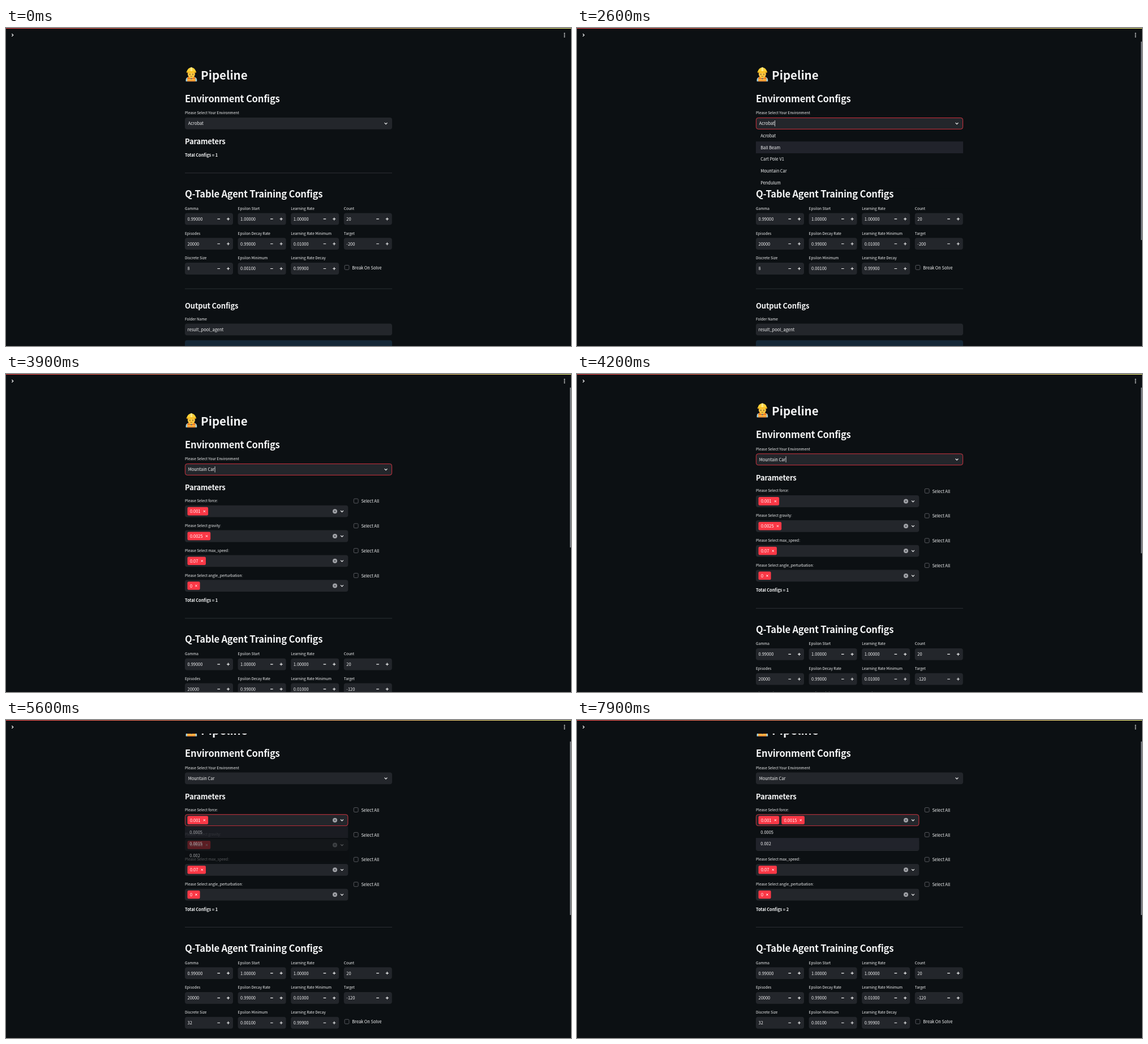
An HTML page with a canvas for the animation above (8 s loop, 998x561 px).

```html
<!DOCTYPE html>
<html lang="en">
<head>
<meta charset="utf-8">
<title>Pipeline</title>
<style>
  html, body { margin: 0; width: 100%; height: 100%; overflow: hidden; background: #0c1013; }
  canvas { display: block; width: 998px; height: 561px; }
</style>
</head>
<body>
<canvas id="stage"></canvas>
<script>
const W = 998, H = 561, LOOP = 8000, TICK = 100;
const BG = '#0c1013', FIELD = '#23262b', INK = '#f4f5f6', RED = '#fb3846', HOVER = '#21232b';
const LEFT = 316, FULL = 366, BOX_H = 20.8, ROW = 43.8, HEADER = 24;
const FONT = '"Noto Sans CJK JP", "Noto Sans CJK SC", "Noto Sans CJK", "Noto Sans", sans-serif';
const CJK = 1.117; // Latin letters in this family are drawn larger per em

const STYLES = {
  h1: { size: 22.88, weight: 700, gap: 0 },
  h2: { size: 18.55, weight: 700, gap: -0.22 },
  h3: { size: 14.5, weight: 700, gap: -0.17 },
  strong: { size: 8.25, weight: 700, gap: -0.06 },
  body: { size: 8.32, weight: 400, gap: 0 },
  label: { size: 7.28, weight: 400, gap: 0 }
};

const canvas = document.getElementById('stage');
const dpr = window.devicePixelRatio || 1;
canvas.width = W * dpr;
canvas.height = H * dpr;
const ctx = canvas.getContext('2d');

// Progress of a change that takes n ticks and is already under way at `start`
const ramp = (t, start, n) => Math.max(0, Math.min(1, (t - start + TICK) / (n * TICK)));

function setStyle(name) {
  const s = STYLES[name];
  ctx.font = `${s.weight} ${s.size / CJK}px ${FONT}`;
  ctx.letterSpacing = s.gap + 'px';
  return s;
}

function text(str, x, cy, name = 'body', color = INK) {
  const s = setStyle(name);
  ctx.fillStyle = color;
  ctx.fillText(str, x, cy + s.size * 0.3555);
}

function textWidth(str) {
  setStyle('body');
  return ctx.measureText(str).width;
}

function round(x, y, w, h, r, color) {
  ctx.fillStyle = color;
  ctx.beginPath();
  ctx.roundRect(x, y, w, h, r);
  ctx.fill();
}

function dot(x, y, r, color) {
  ctx.fillStyle = color;
  ctx.beginPath();
  ctx.arc(x, y, r, 0, 7);
  ctx.fill();
}

function lines(color, width, ...paths) {
  ctx.strokeStyle = color;
  ctx.lineWidth = width;
  ctx.beginPath();
  for (const p of paths) {
    ctx.moveTo(p[0], p[1]);
    for (let i = 2; i < p.length; i += 2) ctx.lineTo(p[i], p[i + 1]);
  }
  ctx.stroke();
}

function faded(alpha, draw) {
  if (alpha <= 0) return;
  ctx.save();
  ctx.globalAlpha = alpha;
  draw();
  ctx.restore();
}

function chevron(x, y) {
  lines(INK, 1.2, [x - 2.4, y - 1.2, x, y + 1.2, x + 2.4, y - 1.2]);
}

function cross(x, y, r, color, width) {
  lines(color, width, [x - r, y - r, x + r, y + r], [x + r, y - r, x - r, y + r]);
}

function field(x, cy, w, focus = 0) {
  round(x, cy - BOX_H / 2, w, BOX_H, 4, FIELD);
  faded(focus, () => {
    ctx.strokeStyle = '#e0323f';
    ctx.lineWidth = 0.9;
    ctx.beginPath();
    ctx.roundRect(x + 0.45, cy - BOX_H / 2 + 0.45, w - 0.9, BOX_H - 0.9, 3.8);
    ctx.stroke();
  });
}

function checkbox(x, cy, label) {
  ctx.strokeStyle = '#6b6d73';
  ctx.lineWidth = 0.8;
  ctx.beginPath();
  ctx.roundRect(x + 0.4, cy - 4, 7.8, 7.8, 1.6);
  ctx.stroke();
  text(label, x + 13.5, cy + 0.2);
}

function numberInput(label, value, col, row, dy) {
  const x = LEFT + col * 93.6, cy = 336.9 + row * ROW + dy;
  text(label, x, cy - 18.6, 'label');
  field(x, cy, 85);
  text(value, x + 4.5, cy);
  lines(INK, 1.1,
    [x + 57.4, cy, x + 62, cy],
    [x + 74, cy, x + 79, cy],
    [x + 76.5, cy - 2.5, x + 76.5, cy + 2.5]);
}

function multiSelect(label, tags, i, focus) {
  const cy = 242.2 + i * ROW;
  text('Please Select ' + label + ':', LEFT, cy - 18.6, 'label');
  field(LEFT, cy, 288.3, focus);
  let x = 320.5;
  for (const tag of tags) {
    const w = textWidth(tag) + 18;
    round(x, cy - 7.4, w, 14.6, 2.2, RED);
    text(tag, x + 4.4, cy, 'body', '#fff');
    cross(x + w - 6.7, cy, 1.6, '#fff', 1);
    x += w + 4.2;
  }
  dot(581, cy, 4, '#a3a5aa');
  cross(581, cy, 1.5, FIELD, 0.8);
  chevron(593.5, cy);
  checkbox(613.9, cy - 18.1, 'Select All');
}

function dropdown(options, top, w, active) {
  ctx.fillStyle = BG;
  ctx.fillRect(LEFT, top, w, options.length * BOX_H);
  options.forEach((name, i) => {
    const y = top + i * BOX_H;
    if (i === active) {
      ctx.fillStyle = HOVER;
      ctx.fillRect(LEFT, y, w, BOX_H);
    }
    text(name, LEFT + 8.2, y + BOX_H / 2);
  });
}

function linkIcon(cy) {
  dot(301.5, cy, 9.5, '#12131a');
  ctx.save();
  ctx.translate(301.5, cy);
  ctx.rotate(-Math.PI / 4);
  ctx.strokeStyle = '#9092a0';
  ctx.lineWidth = 0.9;
  for (const side of [-1, 1]) {
    ctx.beginPath();
    ctx.moveTo(side * 0.3, side * 2);
    ctx.lineTo(side * 3, side * 2);
    ctx.arc(side * 3, 0, 2, side * Math.PI / 2, -side * Math.PI / 2, side > 0);
    ctx.lineTo(side * -0.2, side * -2);
    ctx.stroke();
  }
  lines('#9092a0', 0.9, [-1.8, 0, 1.8, 0]);
  ctx.restore();
}

function worker() {
  const cx = 327.4;
  // shirt and vest
  round(cx - 9.8, 86.6, 19.6, 7.6, [5, 5, 0.5, 0.5], '#9fd0dc');
  round(cx - 7.2, 86.2, 14.4, 8, [3, 3, 0, 0], '#f58220');
  ctx.fillStyle = '#ffd95e';
  ctx.fillRect(cx - 7.2, 90.8, 14.4, 1.4);
  ctx.fillStyle = '#3b6f8f';
  ctx.beginPath();
  ctx.moveTo(cx - 3, 86);
  ctx.lineTo(cx + 3, 86);
  ctx.lineTo(cx, 91);
  ctx.fill();
  // head
  round(cx - 7, 76.5, 14, 7.5, 3, '#5b3a2b');
  ctx.fillStyle = '#fcc840';
  ctx.beginPath();
  ctx.ellipse(cx, 81.5, 6.3, 7, 0, 0, 7);
  ctx.fill();
  dot(cx - 2.6, 81.6, 0.85, '#40302a');
  dot(cx + 2.6, 81.6, 0.85, '#40302a');
  ctx.strokeStyle = '#8a4a24';
  ctx.lineWidth = 0.8;
  ctx.beginPath();
  ctx.arc(cx, 83.6, 2, 0.4, Math.PI - 0.4);
  ctx.stroke();
  // hard hat
  ctx.fillStyle = '#ffd33a';
  ctx.beginPath();
  ctx.ellipse(cx, 77.6, 7.8, 7.9, 0, Math.PI, 0);
  ctx.fill();
  round(cx - 8.8, 76.6, 17.6, 2.2, 1.1, '#f6b91f');
  round(cx - 1.6, 69.3, 3.2, 7, 1.3, '#ffe787');
}

function divider(y) {
  ctx.fillStyle = '#34373c';
  ctx.fillRect(LEFT, y - 0.4, FULL, 0.8);
}

function environment(t, picked) {
  const focus = ramp(t, 2100, 2) * (1 - ramp(t, 5500, 2));
  const name = picked ? 'Mountain Car' : 'Acrobat';
  worker();
  text('Pipeline', 344, 82.9, 'h1');
  text('Environment Configs', LEFT, 124.3, 'h2');
  text('Please Select Your Environment', LEFT, 149.9, 'label');
  field(LEFT, 168.4, FULL, focus);
  text(name, 321.8, 168.4);
  if (t >= 2100 && t < 4700) {
    const x = 322.6 + textWidth(name);
    lines(INK, 0.8, [x, 163, x, 173.6]);
  }
  chevron(671, 168.4);
  text('Parameters', LEFT, 200.3, 'h3');
}

function training(loaded, dy) {
  divider(255.8 + dy);
  text('Q-Table Agent Training Configs', LEFT, 292.5 + dy, 'h2');
  const columns = [
    [['Gamma', '0.99000'], ['Episodes', '20000'], ['Discrete Size', loaded ? '32' : '8']],
    [['Epsilon Start', '1.00000'], ['Epsilon Decay Rate', '0.99000'], ['Epsilon Minimum', '0.00100']],
    [['Learning Rate', '1.00000'], ['Learning Rate Minimum', '0.01000'], ['Learning Rate Decay', '0.99900']],
    [['Count', '20'], ['Target', loaded ? '-120' : '-200']]
  ];
  columns.forEach((items, col) => items.forEach(([label, value], row) =>
    numberInput(label, value, col, row, dy)));
  checkbox(597.7, 422.5 + dy, 'Break On Solve');
  divider(460 + dy);
  text('Output Configs', LEFT, 490.3 + dy, 'h3');
  text('Folder Name', LEFT, 513.4 + dy, 'label');
  field(LEFT, 531.9 + dy, FULL);
  text('result_pool_agent', 320.6, 531.9 + dy);
  round(LEFT, 550.8 + dy, FULL, 30, 4, '#152837');
}

function scrollAt(t) {
  const steps = [0, 17.7, 48, 65.5];
  return steps[Math.max(0, Math.min(3, (t - 4100) / TICK))];
}

function header(t, scroll, loaded) {
  ctx.fillStyle = BG;
  ctx.fillRect(0, 0, W, HEADER);
  const g = ctx.createLinearGradient(0, 0, W, 0);
  g.addColorStop(0, '#ff4b4b');
  g.addColorStop(1, '#fffd80');
  ctx.fillStyle = g;
  ctx.fillRect(0, 0, W, 1);
  lines(INK, 1.2, [10.3, 10.2, 12.7, 12.5, 10.3, 14.8]);
  for (const y of [9.6, 12.5, 15.4]) dot(986.5, y, 1, INK);

  faded(ramp(t, 600, 2), () => {
    const top = scroll * 0.58, end = top + (loaded ? 306 : 374);
    const y = Math.max(HEADER, top);
    ctx.fillStyle = '#777b80';
    ctx.fillRect(996, y, 2, end - y);
  });
}

function draw(t) {
  const picked = t >= 3400, loaded = t >= 3700, added = t >= 6800;
  const scroll = scrollAt(t), dy = loaded ? 4 * ROW : 0;

  ctx.setTransform(dpr, 0, 0, dpr, 0, 0);
  ctx.fillStyle = BG;
  ctx.fillRect(0, 0, W, H);
  ctx.lineCap = 'butt';

  ctx.save();
  ctx.translate(0, -scroll);
  environment(t, picked);
  if (loaded) {
    const force = added ? ['0.001', '0.0015'] : ['0.001'];
    multiSelect('force', force, 0, ramp(t, 5500, 2));
    multiSelect('gravity', ['0.0025'], 1, 0);
    multiSelect('max_speed', ['0.07'], 2, 0);
    multiSelect('angle_perturbation', ['0'], 3, 0);
  }
  text('Total Configs = ' + (t >= 7000 ? 2 : 1), LEFT, 224 + dy, 'strong');
  training(loaded, dy);

  faded(ramp(t, 600, 2) * (1 - ramp(t, 1200, 2)), () => linkIcon(292.2));
  faded(ramp(t, 1600, 1) * (1 - ramp(t, 1800, 2)), () => linkIcon(200.2));

  faded(ramp(t, 2100, 3) * (1 - ramp(t, 3400, 2)), () => {
    const active = [2600, 2800, 3000].filter(s => t >= s).length;
    dropdown(['Acrobat', 'Ball Beam', 'Cart Pole V1', 'Mountain Car', 'Pendulum'], 179.4, FULL, active);
  });
  faded(ramp(t, 5500, 3), () => {
    const active = t < 5900 ? 0 : t >= 6000 && t < 6200 ? 2 : 1;
    const options = added ? ['0.0005', '0.002'] : ['0.0005', '0.0015', '0.002'];
    dropdown(options, 252.8, 288.3, active);
  });
  ctx.restore();

  header(t, scroll, loaded);
}

const start = performance.now();
function frame() {
  const t = (performance.now() - start) % LOOP;
  draw(Math.floor(t / TICK) * TICK);
  requestAnimationFrame(frame);
}
frame();
</script>
</body>
</html>
```
